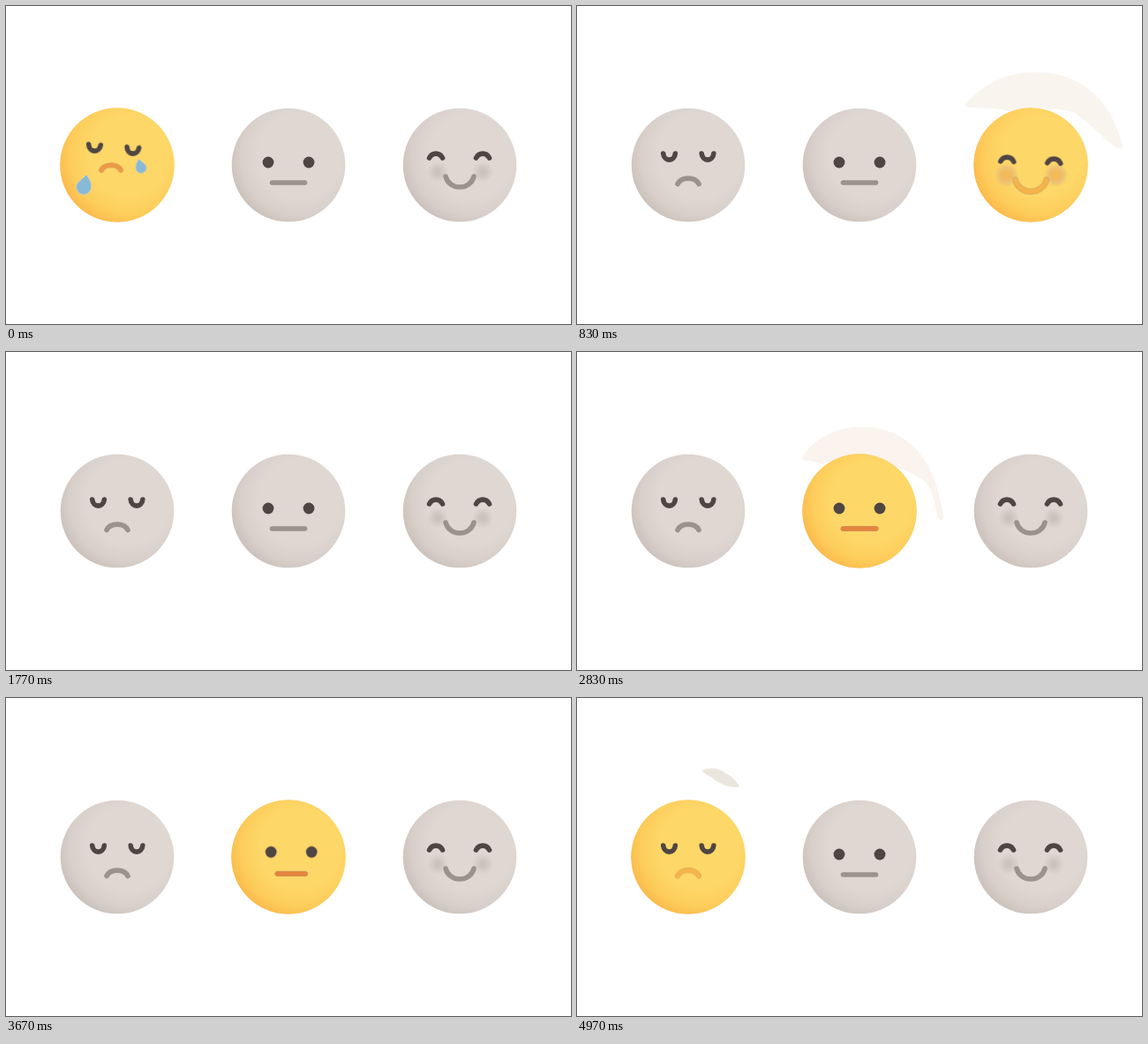
Write an HTML page that moves like this. It is 640 px wide and 360 px high and loops after 5 s.

```html
<!DOCTYPE html>
<html lang="en">
<head>
<meta charset="utf-8">
<title>Mood faces</title>
<style>
html, body { margin: 0; width: 100%; height: 100%; overflow: hidden; background: #fff; }
svg { display: block; width: 100%; height: 100%; }

.line { fill: none; stroke: #9b928d; stroke-width: 5.6; stroke-linecap: round; }
.eyes { fill: none; stroke: #4f4543; stroke-width: 5.6; stroke-linecap: round; }
.dots { fill: #4f4543; stroke: none; }

.lit, .eyes, .mouth, .look, .tear, .sweep, .gate, .warm {
  animation: 5s linear infinite;
}
.eyes, .mouth, .look { animation-timing-function: ease-in-out; }

/* Colour on and off */
.sad .lit { animation-name: sad-lit; }
.flat .lit { animation-name: flat-lit; }
.glad .lit { animation-name: glad-lit; }
@keyframes sad-lit { 0%, 10% { opacity: 1 } 12%, 97.4% { opacity: 0 } 98.8%, 100% { opacity: 1 } }
@keyframes glad-lit { 0%, 13.4% { opacity: 0 } 15%, 33% { opacity: 1 } 35%, 100% { opacity: 0 } }
@keyframes flat-lit { 0%, 54% { opacity: 0 } 55.6%, 77% { opacity: 1 } 80%, 100% { opacity: 0 } }

/* Sad: head shake and tears */
.sad .eyes { animation-name: sad-eyes; }
.sad .mouth { animation-name: sad-mouth; }
.sad .warm { animation-name: sad-warm; }
@keyframes sad-eyes {
  0% { transform: translate(-5px, -8.5px) rotate(4deg) }
  5% { transform: translate(4px, -5px) rotate(-3deg) }
  10.5%, 100% { transform: none }
}
@keyframes sad-mouth {
  0% { transform: translate(-7px, -13.5px) scale(.92, .9) }
  5% { transform: translate(5px, -7px) scale(.94, .92) }
  10.5%, 100% { transform: none }
}
@keyframes sad-warm { 0%, 12% { stroke: #ee9b42 } 12.1%, 100% { stroke: #f5b54c } }

.tear { fill: #88b9d8; stroke: #cfd0b4; stroke-width: 1; animation-timing-function: ease-in; }
.tear.l { animation-name: tear-l; }
.tear.r { animation-name: tear-r; }
@keyframes tear-l {
  0% { transform: translate(-38px, 22px); opacity: 1 }
  6% { transform: translate(-37px, 60px); opacity: 1 }
  8%, 100% { transform: translate(-37px, 60px); opacity: 0 }
}
@keyframes tear-r {
  0% { transform: translate(27px, 1px) scale(-.72, .72); opacity: 1 }
  9% { transform: translate(32px, 36px) scale(-.95, .95); opacity: 1 }
  11%, 100% { transform: translate(32px, 38px) scale(-.95, .95); opacity: 0 }
}

/* Happy: nodding */
.glad .eyes { animation-name: glad-eyes; }
.glad .mouth { animation-name: glad-mouth; }
@keyframes glad-eyes {
  0%, 15.2% { transform: none }
  16.6% { transform: translate(0, 5px) rotate(2deg) }
  19% { transform: translate(0, 7px) rotate(3deg) }
  23% { transform: translate(0, -4px) rotate(-2deg) }
  27.5% { transform: translate(0, 4px) rotate(2deg) }
  32%, 100% { transform: none }
}
@keyframes glad-mouth {
  0%, 15.2% { transform: none }
  16.6% { transform: translate(0, 2.5px) scale(1.1) }
  19% { transform: translate(0, 4px) scale(1.1) }
  23% { transform: translate(0, -4px) scale(1.08) }
  27.5% { transform: translate(0, 2px) scale(1.08) }
  32%, 100% { transform: none }
}

/* Neutral: glancing aside */
.flat .eyes { animation-name: flat-eyes; }
.flat .mouth { animation-name: flat-mouth; }
@keyframes flat-eyes {
  0%, 59% { transform: none }
  63.5%, 66% { transform: translate(-6.5px, -7px) }
  71% { transform: translate(6px, -5px) }
  76%, 100% { transform: none }
}
@keyframes flat-mouth {
  0%, 59% { transform: none }
  63.5%, 66% { transform: translate(-6px, -3px) scaleX(.67) }
  71% { transform: translate(6px, -2px) scaleX(.75) }
  76%, 100% { transform: none }
}

/* Pale sweep thrown over the top; the delay sets each face's start */
.sweep { fill: #faf4ef; opacity: 0; animation-name: sweep; }
.sad .sweep { animation-delay: -.13s; }
.glad .sweep { animation-delay: -4.33s; }
.flat .sweep { animation-delay: -2.3s; }
.gate { animation-name: gate; animation-timing-function: step-end; }
@keyframes gate { 0% { visibility: hidden } 90% { visibility: visible } }
@keyframes sweep {
  0%, 1.5% {
    opacity: 0; fill: #e9e4da;
    d: path("M15-98C24-102 36-100 42-95C50-91 55-86 58-80C56-78 50-79 46-80C40-81 32-86 30-87C28-89 24-92 22-92C20-94 17-96 15-98Z");
  }
  1.9%, 2.1% {
    opacity: 1; fill: #ebe6dd;
    d: path("M15-98C24-102 36-100 42-95C50-91 55-86 58-80C56-78 50-79 46-80C40-81 32-86 30-87C28-89 24-92 22-92C20-94 17-96 15-98Z");
  }
  2.6% {
    opacity: 1; fill: #faf3ee;
    d: path("M-65-59C-52-84-22-95 2-95C64-95 88-45 95 8C94 13 90 12 88 7C84-20 80-30 70-36C40-56-20-66-44-52C-48-58-62-55-65-59Z");
  }
  3.2% {
    opacity: 1; fill: #faf4ef;
    d: path("M-74-68C-55-92-28-105 6-105C60-105 92-70 104-22C104-18 100-17 96-20C84-28 66-48 48-60C30-64-10-66-24-60C-40-66-66-63-74-66Z");
  }
  4% {
    opacity: .8; fill: #fbf6f2;
    d: path("M-74-72C-55-96-28-108 8-108C62-108 98-74 110-18C110-14 106-14 102-18C88-34 68-58 50-68C30-80-10-82-24-80C-40-82-66-68-74-70Z");
  }
  5.4%, 100% {
    opacity: 0; fill: #fff;
    d: path("M-74-72C-55-96-28-108 8-108C62-108 98-74 110-18C110-14 106-14 102-18C88-34 68-58 50-68C30-80-10-82-24-80C-40-82-66-68-74-70Z");
  }
}
</style>
</head>
<body>
<svg viewBox="0 0 640 360">
  <defs>
    <radialGradient id="grey" cx=".6" cy=".42" r=".64">
      <stop offset=".58" stop-color="#dfd7d2"/>
      <stop offset=".82" stop-color="#d8cfca"/>
      <stop offset="1" stop-color="#c9c0ba"/>
    </radialGradient>
    <radialGradient id="gold" cx=".6" cy=".42" r=".64">
      <stop offset=".55" stop-color="#fdd768"/>
      <stop offset=".8" stop-color="#fdcd5b"/>
      <stop offset="1" stop-color="#fbb84a"/>
    </radialGradient>
    <radialGradient id="blush">
      <stop offset=".2" stop-color="#cbc2bc"/>
      <stop offset="1" stop-color="#cbc2bc" stop-opacity="0"/>
    </radialGradient>
    <radialGradient id="glow">
      <stop offset=".3" stop-color="#f5b956"/>
      <stop offset="1" stop-color="#f5b956" stop-opacity="0"/>
    </radialGradient>
    <g id="head">
      <circle r="64.3" fill="url(#grey)"/>
    </g>
    <circle id="sun" r="64.8" fill="url(#gold)"/>
    <path id="frown" d="M-12 21.5C-8 13 8 13 12 21.5"/>
    <path id="bar" d="M-18.5 20H18.5"/>
    <path id="smile" d="M-16 13C-12 29 12 29 16 13"/>
    <path id="lid" d="M-6.8-3.5C-6 6 6 6 6.8-3.5"/>
    <path id="arch" d="M-7.5 2C-4-4.5 4-4.5 7.5 2"/>
    <path id="drop" d="M3-11C7-6 9-1 8.5 3A8.5 8.5 0 0 1-8.5 3C-8.5-3-1-6 3-11Z"/>
  </defs>

  <g class="sad" transform="translate(126 180)">
    <g class="gate"><path class="sweep" d="M0 0"/></g>
    <use href="#head"/>
    <use class="lit" href="#sun"/>
    <g class="mouth">
      <use class="line" href="#frown"/>
      <g class="lit"><use class="line warm" href="#frown"/></g>
    </g>
    <g class="eyes">
      <use href="#lid" x="-21.5" y="-9.5"/>
      <use href="#lid" x="22" y="-9.5"/>
    </g>
    <use class="tear l" href="#drop"/>
    <use class="tear r" href="#drop"/>
  </g>

  <g class="flat" transform="translate(320 180)">
    <path class="sweep" d="M0 0"/>
    <use href="#head"/>
    <use class="lit" href="#sun"/>
    <g class="mouth">
      <use class="line" href="#bar"/>
      <use class="line lit" href="#bar" style="stroke: #e4843d"/>
    </g>
    <g class="eyes dots">
      <circle cx="-23" cy="-3" r="6.4"/>
      <circle cx="23" cy="-3" r="6.4"/>
    </g>
  </g>

  <g class="glad" transform="translate(514 180)">
    <path class="sweep" d="M0 0"/>
    <use href="#head"/>
    <use class="lit" href="#sun"/>
    <g class="mouth">
      <g fill="url(#blush)">
        <circle cx="-25" cy="8" r="12"/>
        <circle cx="26" cy="8" r="12"/>
      </g>
      <g class="lit" fill="url(#glow)">
        <circle cx="-25" cy="8" r="12"/>
        <circle cx="26" cy="8" r="12"/>
      </g>
      <use class="line" href="#smile"/>
      <use class="line lit" href="#smile" style="stroke: #f5b34a"/>
    </g>
    <g class="eyes">
      <use href="#arch" x="-27" y="-10"/>
      <use href="#arch" x="26" y="-10"/>
    </g>
  </g>
</svg>
</body>
</html>
```
